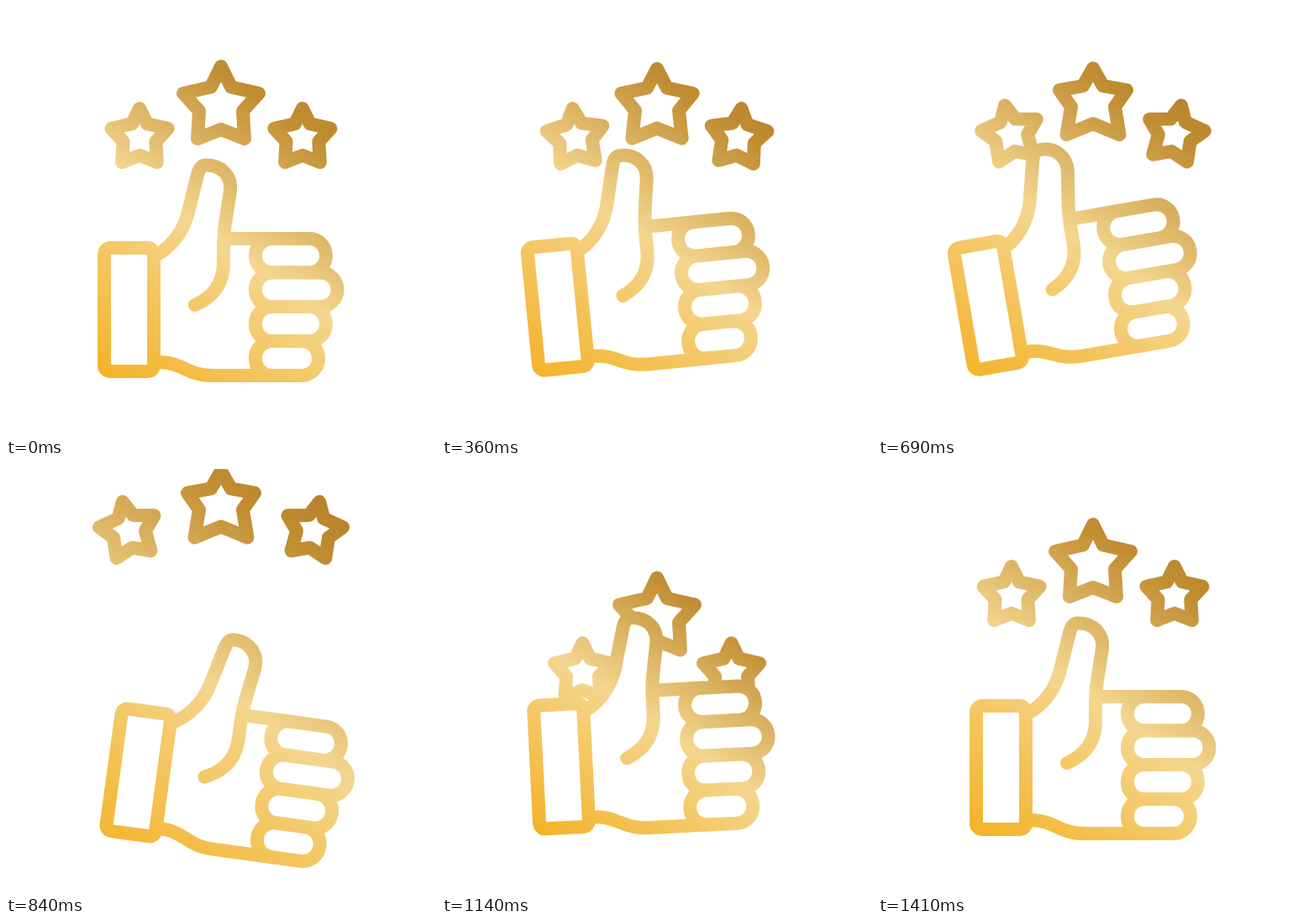
Write an HTML page without scripts that moves like this. It is 512x512 px and loops after 1.8 s.

```html
<!DOCTYPE html>
<html lang="en">
<head>
<meta charset="utf-8">
<title>Thumbs up with stars</title>
<style>
  html, body { margin: 0; width: 100%; height: 100%; overflow: hidden; background: #fff; }
  svg { display: block; width: 100%; height: 100%; }

  .line { fill: none; stroke: #fff; stroke-width: 16; stroke-linecap: round; stroke-linejoin: round; }
  .solid { fill: #000; }
  .small { stroke-width: 21.5; }

  .hand, .toss, .spin, .bend, .gold { animation: 1800ms linear infinite; }
  .hand { animation-name: swing; transform-origin: 109px 448px; }
  .toss { animation-name: toss; }
  .spin { animation-name: spin; }
  .bend { animation-name: bend; }
  .gold { animation-name: sheen; transform-origin: 256px 256px; }

  .middle { --out: 0px; --up: -203px; --in: 0px; --down: 155px; }
  .side { --out: -38px; --up: -227px; --in: 20.6px; --down: 223px; }

  @keyframes swing {
    0%, 5.56% { transform: rotate(0deg); animation-timing-function: cubic-bezier(.333, 0, .667, 1); }
    35.7% { transform: rotate(-12deg); animation-timing-function: cubic-bezier(.333, 0, .667, 1); }
    49.44% { transform: rotate(10deg); animation-timing-function: cubic-bezier(.333, 0, .667, 1); }
    59.72% { transform: rotate(-4deg); animation-timing-function: cubic-bezier(.333, 0, .667, 1); }
    70.28%, 100% { transform: rotate(0deg); }
  }
  /* Stars fly out at the top, then rise again from behind the hand. */
  @keyframes toss {
    0%, 35.83% { transform: translate(0px, 0px); animation-timing-function: cubic-bezier(.333, 0, .667, .333); }
    54.44% { transform: translate(var(--out), var(--up)); animation-timing-function: step-end; }
    55% { transform: translate(var(--in), var(--down)); animation-timing-function: cubic-bezier(.333, .667, .667, 1); }
    78.33%, 100% { transform: translate(0px, 0px); }
  }
  @keyframes spin {
    0%, 5.56% { transform: rotate(0deg); animation-timing-function: cubic-bezier(.333, 0, .667, 1); }
    35.7% { transform: rotate(-12deg); }
    54.44% { transform: rotate(-12deg); animation-timing-function: step-end; }
    55%, 100% { transform: rotate(0deg); }
  }
  @keyframes bend {
    0%, 5.56% {
      d: path("M0 -47L12 -22.5L45 -15L26 6L28 39L0 28L-28 39L-26 6L-45 -15L-12 -22.5Z");
      animation-timing-function: cubic-bezier(.333, 0, .667, 1);
    }
    35.7% { d: path("M0 -41L12 -20L40 -15L26 5L31.5 38L0 25L-31.5 38L-26 5L-40 -15L-12 -20Z"); }
    54.44% {
      d: path("M0 -41L12 -20L40 -15L26 5L31.5 38L0 25L-31.5 38L-26 5L-40 -15L-12 -20Z");
      animation-timing-function: step-end;
    }
    55%, 100% { d: path("M0 -47L12 -22.5L45 -15L26 6L28 39L0 28L-28 39L-26 6L-45 -15L-12 -22.5Z"); }
  }
  /* The gradient spans whatever part of the drawing is visible. */
  @keyframes sheen {
    0%, 5.56% { transform: translate(0px, 0px) scale(1); }
    38.33% { transform: translate(-17px, -2px) scale(1.01); }
    46.67% { transform: translate(2px, -13px) scale(1.177); }
    51.5% { transform: translate(5px, -10px) scale(1.2); }
    54.44% { transform: translate(7px, 83px) scale(.857); }
    57% { transform: translate(-3px, 57px) scale(.8); }
    63.33% { transform: translate(-7px, 29px) scale(.88); }
    78.33%, 100% { transform: translate(0px, 0px) scale(1); }
  }
</style>
</head>
<body>
<svg viewBox="0 0 512 512">
  <defs>
    <linearGradient id="metal" gradientUnits="userSpaceOnUse" x1="119" y1="454" x2="393" y2="58">
      <stop offset="0" stop-color="#f4b123"/>
      <stop offset=".46" stop-color="#f4d68f"/>
      <stop offset=".8" stop-color="#c28e33"/>
      <stop offset="1" stop-color="#b07a24"/>
    </linearGradient>

    <mask id="art" maskUnits="userSpaceOnUse" x="0" y="6" width="512" height="506">
      <g transform="translate(256 119)">
        <g class="toss middle">
          <path class="line bend" d="M0 -47L12 -22.5L45 -15L26 6L28 39L0 28L-28 39L-26 6L-45 -15L-12 -22.5Z"/>
        </g>
      </g>
      <g transform="translate(159 157)">
        <g class="toss side"><g class="spin">
          <path class="line small" transform="scale(.745)" d="M0 -47L12 -22.5L45 -15L26 6L28 39L0 28L-28 39L-26 6L-45 -15L-12 -22.5Z"/>
        </g></g>
      </g>
      <g transform="translate(353 157) scale(-1 1)">
        <g class="toss side"><g class="spin">
          <path class="line small" transform="scale(.745)" d="M0 -47L12 -22.5L45 -15L26 6L28 39L0 28L-28 39L-26 6L-45 -15L-12 -22.5Z"/>
        </g></g>
      </g>

      <g class="hand">
        <path class="solid" d="M176 298L180 296C198 286 211 267 216 249L228 201Q231 189 239 189.5C257 189.5 269 203 267 220L262 252Q260 264 259.500 277H320V440H247C214 440 212 424 180 424H176Z"/>
        <g class="line">
          <g class="solid">
            <rect x="117" y="288" width="59" height="147" rx="7"/>
            <rect x="297" y="277" width="84" height="40.500" rx="20"/>
            <rect x="297" y="317.500" width="97.500" height="40.500" rx="20"/>
            <rect x="297" y="358" width="84" height="41" rx="20"/>
            <rect x="297" y="399" width="75" height="41" rx="20"/>
          </g>
          <path d="M180 296C198 286 211 267 216 249L228 201Q231 189 239 189.5C257 189.5 269 203 267 220L262 252Q259 268 259 285V306Q259 341 225 356"/>
          <path d="M263 277H320M180 424C212 424 214 440 247 440H320"/>
        </g>
      </g>
    </mask>
  </defs>

  <g mask="url(#art)">
    <rect class="gold" x="-600" y="-600" width="1800" height="1800" fill="url(#metal)"/>
  </g>
</svg>
</body>
</html>
```
